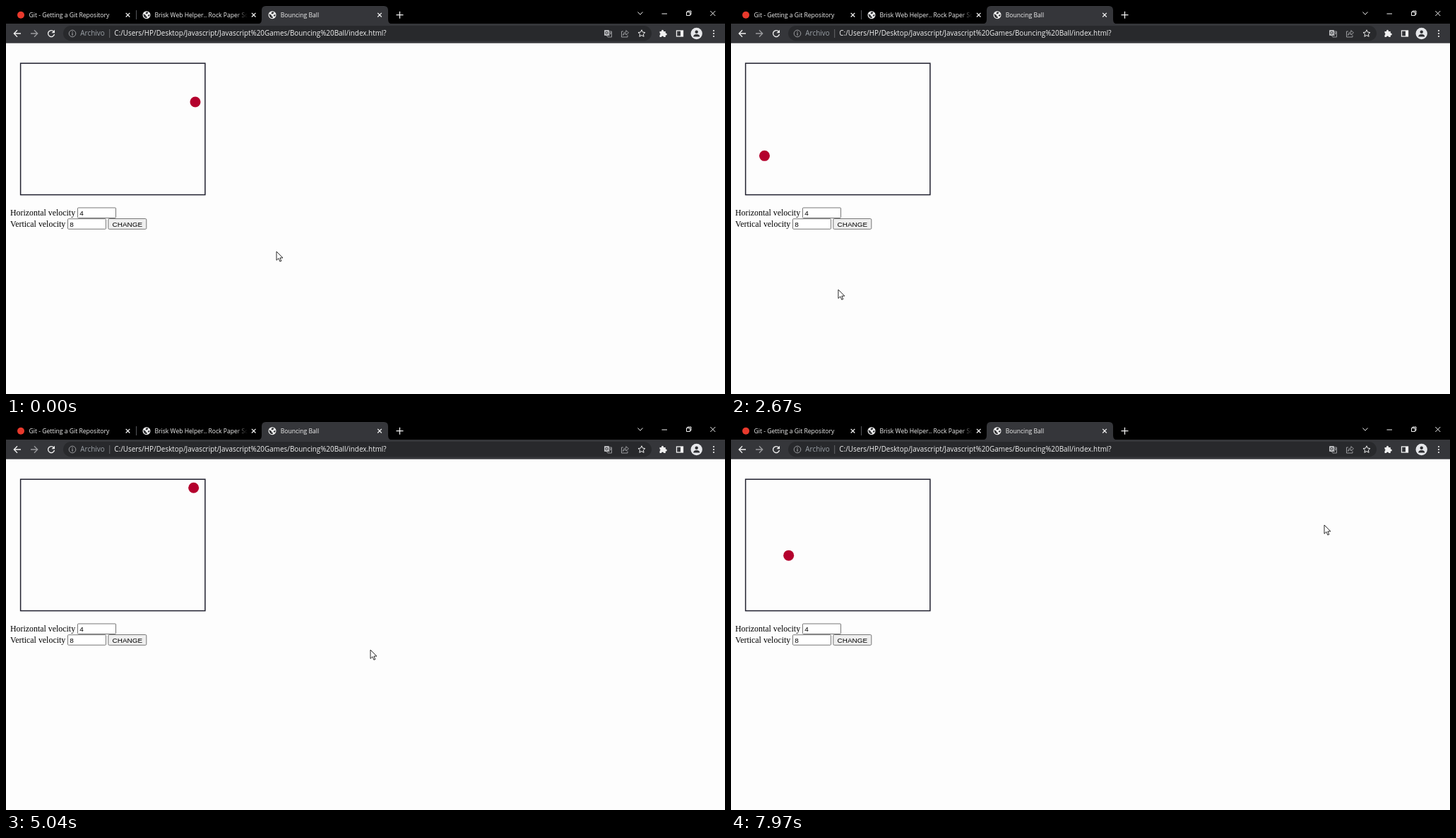
Write an HTML page that moves like this. It is 1018 px wide and 550 px high and loops after 8 s.

```html
<!DOCTYPE html>
<html lang="en">
<head>
<meta charset="utf-8">
<title>Bouncing Ball</title>
<style>
  html, body { margin: 0; width: 100%; height: 100%; overflow: hidden; background: #fdfdfd; }
  svg { display: block; width: 100vw; height: 100vh; }
  text { white-space: pre; }
  .tab { font: 8.6px "Open Sans", "Noto Sans", sans-serif; fill: #f1f1f1; }
  .url { font: 9.92px "Open Sans", "Noto Sans", sans-serif; fill: #f1f1f1; }
  .label { font: 11.92px "Liberation Serif", serif; fill: #000; }
  .control { font: 9.93px "Liberation Sans", sans-serif; fill: #000; }
  .line { fill: none; stroke: #f1f1f1; stroke-width: 1.3; }
  .dim { stroke: #9a9b9e; }
  .thin { stroke-width: 1; }
  .field { fill: #fff; stroke: #767676; stroke-width: 1; }
</style>
</head>
<body>
<svg viewBox="0 0 1018 550" preserveAspectRatio="none">
  <defs>
    <linearGradient id="fade" gradientUnits="userSpaceOnUse" x1="325" x2="342">
      <stop offset="0" stop-color="#f1f1f1"/>
      <stop offset="1" stop-color="#f1f1f1" stop-opacity="0"/>
    </linearGradient>
    <clipPath id="titleClip"><rect x="205" y="0" width="137" height="25"/></clipPath>
    <g id="globe">
      <circle r="5.5" fill="#f1f1f1"/>
      <path d="M-4.3-1.6L-1.2.2L-.6 2L1 2.6L.4 4.6C-2.6 4.6-4.6 2.2-4.3-1.6ZM.2-4.4L2.6-3.6L1.4-2L-.6-1.2L-1.6-2.6ZM1.6 0L4.5-.8L4.2 1.6L2.6 2Z" fill="#303134"/>
    </g>
    <path id="cross" class="line" d="M-2.8-2.8L2.8 2.8M2.8-2.8L-2.8 2.8"/>
    <path id="arrow" d="M5 0H-4.6M0-4.7L-4.7 0L0 4.7"/>
  </defs>

  <rect width="1018" height="550" fill="#fdfdfd"/>

  <!-- tab strip -->
  <rect width="1018" height="25.5" fill="#000"/>
  <path d="M356 25.5Q362 25.5 362 19V6Q362 0 368 0H535Q541 0 541 6V19Q541 25.5 547 25.5Z" fill="#35363a"/>
  <circle cx="21" cy="12.7" r="5" fill="#e8392c"/>
  <text class="tab" x="32.5" y="15.8">Git - Getting a Git Repository</text>
  <path d="M184.5 6V19" stroke="#55565a"/>
  <use href="#globe" x="199" y="12.7"/>
  <g clip-path="url(#titleClip)">
    <text class="tab" x="210.5" y="15.8" style="fill:url(#fade)">Brisk Web Helper.. Rock Paper Scissors</text>
  </g>
  <use href="#globe" x="377" y="12.7"/>
  <text class="tab" x="388.7" y="15.8">Bouncing Ball</text>
  <use href="#cross" x="172.5" y="12.7"/>
  <use href="#cross" x="350.7" y="12.7"/>
  <use href="#cross" x="529" y="12.7"/>
  <path class="line" d="M552.5 12.7H562.5M557.5 7.7V17.7"/>

  <!-- window buttons -->
  <path class="line thin" d="M894.5 8.5L898 12.2L901.5 8.5M928.5 11H936"/>
  <path class="line thin" d="M963.5 8.5H968.5V13.5H963.5ZM965 8.2V7H970V12H968.7M997.3 7L1004.3 14M1004.3 7L997.3 14"/>

  <!-- toolbar -->
  <rect y="25" width="1018" height="27.7" fill="#35363a"/>
  <rect x="81" y="28" width="833" height="21.5" rx="10.7" fill="#28292c"/>
  <use href="#arrow" class="line" transform="translate(16 39)"/>
  <use href="#arrow" class="line dim" transform="translate(40 39) scale(-1 1)"/>
  <path class="line" d="M67.6 36.2A4.5 4.5 0 1 0 68.5 40"/>
  <path d="M69 33.8V38.3H64.5Z" fill="#f1f1f1"/>
  <circle class="line dim thin" cx="94" cy="39" r="4.8"/>
  <path class="line dim" d="M94 38.3V41.8M94 36V37.2"/>
  <text class="url" x="105.3" y="42.3" style="fill:#9aa0a6">Archivo</text>
  <path d="M146.7 33V45" stroke="#66676a"/>
  <text class="url" x="153.3" y="42.3">C:/Users/HP/Desktop/Javascript/Javascript%20Games/Bouncing%20Ball/index.html?</text>

  <!-- toolbar icons -->
  <rect x="847" y="34" width="7" height="8" rx="1" fill="#b9babd"/>
  <path class="line thin dim" d="M854 36H857.5V44H852L850.5 42M853 38.2H857M855 37.2V38.2M853.5 42Q856 40.5 856.2 38.2"/>
  <circle cx="850.4" cy="38" r="1.7" fill="none" stroke="#303134" stroke-width=".9"/>
  <path class="line thin dim" d="M874 36H871.5V44H880V41.5M873.5 41.5Q874 37 878 37V34.5L881.5 38L878 41V39Q875 39 873.5 41.5Z"/>
  <path class="line thin" d="M900 33.8L901.5 37.1L905 37.5L902.4 39.8L903.1 43.3L900 41.5L896.9 43.3L897.6 39.8L895 37.5L898.5 37.1Z"/>
  <path d="M925.5 36H928V35.3A1.5 1.5 0 0 1 931 35.3V36H933.8V38.5H934.3A1.5 1.5 0 0 1 934.3 41.5H933.8V44H931.2A1.6 1.6 0 0 0 928 44H925.5V41.2A1.6 1.6 0 0 0 925.5 38.3Z" fill="#f1f1f1"/>
  <rect class="line" x="949.5" y="35" width="9" height="8"/>
  <rect x="955" y="35" width="3.8" height="8" fill="#f1f1f1"/>
  <circle cx="977.7" cy="39" r="8.2" fill="#e6e7ea"/>
  <circle cx="977.7" cy="36.7" r="2.2" fill="#303134"/>
  <path d="M973.2 43.5Q973.2 40 977.7 40T982.2 43.5Z" fill="#303134"/>
  <g fill="#f1f1f1">
    <circle cx="1002" cy="35" r="1.1"/><circle cx="1002" cy="39" r="1.1"/><circle cx="1002" cy="43" r="1.1"/>
  </g>

  <!-- page -->
  <rect x="20.6" y="81.2" width="261.3" height="186.4" fill="none" stroke="#20202e" stroke-width="1.5"/>
  <circle id="ball" r="7.5" fill="#b4002d"/>
  <text class="label" x="5.9" y="297">Horizontal velocity</text>
  <rect class="field" x="101.5" y="286" width="54" height="14.5" rx="1"/>
  <text class="control" x="104.2" y="296.8">4</text>
  <text class="label" x="5.9" y="312.5">Vertical velocity</text>
  <rect class="field" x="87.5" y="301.7" width="54" height="14.5" rx="1"/>
  <text class="control" x="90.2" y="312.5">8</text>
  <rect class="field" x="144.8" y="301.5" width="54" height="14.8" rx="1.5" style="fill:#efefef"/>
  <text class="control" x="150.6" y="312.5">CHANGE</text>

  <path id="cursor" d="M0 0V12.4L2.9 9.7L4.9 14.2L6.8 13.4L4.9 9H8.9Z" fill="#fff" stroke="#111" stroke-width=".9"/>
</svg>
<script>
const LOOP = 8000, FRAME = 1000 / 30;
const ball = document.getElementById("ball");
const cursor = document.getElementById("cursor");

// time, distance travelled across, distance travelled down (both unfolded)
const travel = [
  [0, 0, 47], [800, 74.5, 195], [1970, 187.5, 419], [3330, 326, 695.5],
  [5040, 494, 1031.5], [6700, 657.5, 1358], [7970, 784, 1610.5]
];
// time, x, y of the pointer tip
const pointer = [
  [0, 383, 348], [130, 380, 342], [670, 243, 55], [800, 235, 37],
  [1300, 157, 25], [2000, 157, 25], [2430, 150, 381], [2700, 152, 403],
  [3200, 156, 325], [4170, 156, 325], [4570, 350, 432], [4970, 516, 323],
  [5840, 516, 323], [6600, 840, 117], [6740, 840, 117], [7470, 840, 146], [8000, 840, 146]
];

function sample(steps, t, ease = u => u) {
  let i = 1;
  while (i < steps.length - 1 && steps[i][0] <= t) i++;
  const [t0, x0, y0] = steps[i - 1], [t1, x1, y1] = steps[i];
  const u = ease(Math.min(1, (t - t0) / (t1 - t0)));
  return [x0 + (x1 - x0) * u, y0 + (y1 - y0) * u];
}

// Reflects a straight run between two walls.
function bounce(d, low, high) {
  const span = high - low, p = ((d % (2 * span)) + 2 * span) % (2 * span);
  return low + (p < span ? p : 2 * span - p);
}

const place = (el, x, y) => el.setAttribute("transform", `translate(${x.toFixed(2)} ${y.toFixed(2)})`);
const smooth = u => u * u * (3 - 2 * u);

function draw() {
  const now = performance.now() % LOOP;
  const t = Math.floor((now + 4) / FRAME) * FRAME % LOOP;
  const [dx, dy] = sample(travel, t);
  place(ball, bounce(239.5 - dx, 28.5, 274), bounce(dy, 89, 260));
  place(cursor, ...sample(pointer, t, smooth));
  requestAnimationFrame(draw);
}
draw();
</script>
</body>
</html>
```
